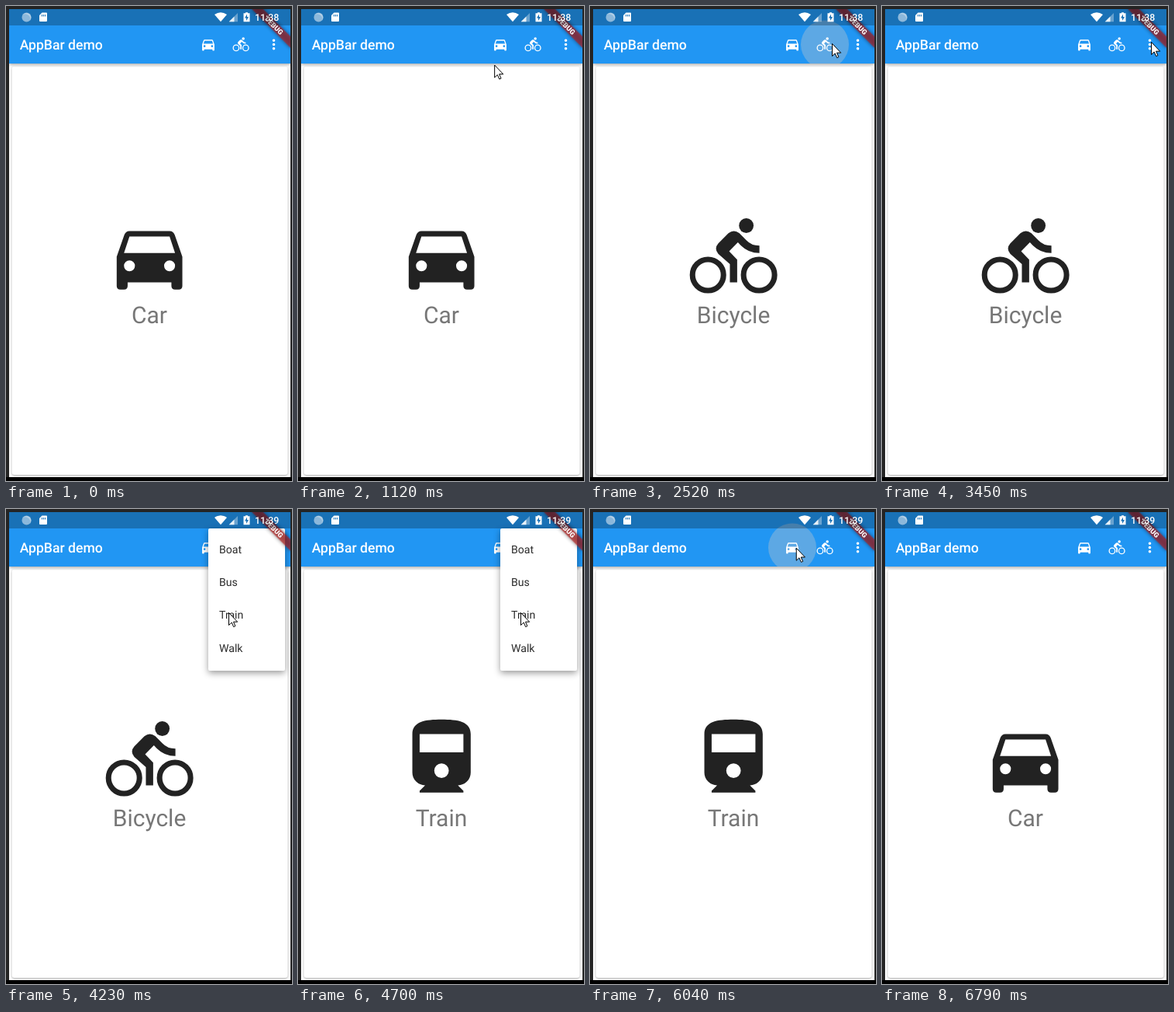
These frames come from a looping animation (369 by 611 pixels, 7480 ms). An HTML page:

```html
<!DOCTYPE html>
<html lang="en">
<head>
<meta charset="utf-8">
<title>AppBar demo</title>
<style>
  html, body { margin: 0; width: 100%; height: 100%; overflow: hidden; background: #242424; }
  svg { display: block; }
  text { font-family: Roboto, sans-serif; text-rendering: geometricPrecision; }
  .medium { font-weight: 500; fill: #fff; }
  .ring { fill: none; stroke: currentColor; stroke-width: 1.5; }
  #bar { filter: drop-shadow(0 1px 2px #0006); }
  #card { filter: drop-shadow(0 1px 1px #0005); }
  #panel { filter: drop-shadow(0 3px 4px #0006); }
  #strip { filter: drop-shadow(0 0 3px #000b); }
</style>
</head>
<body>
<svg width="369" height="611" viewBox="0 0 369 611">
  <defs fill-rule="evenodd">
    <path id="Car" fill-rule="evenodd" d="M3 12L5.1 6Q5.5 5 6.500 5h11q1 0 1.400 1L21 12v8q0 1-1 1h-1q-1 0-1-1v-1H6v1q0 1-1 1H4q-1 0-1-1zM5 11h14l-1.500-4.500h-11zM5 14.500a1.500 1.500 0 0 0 3 0 1.500 1.500 0 0 0-3 0zm11 0a1.500 1.500 0 0 0 3 0 1.500 1.500 0 0 0-3 0z"/>
    <g id="Bicycle">
      <circle cx="15.5" cy="3.5" r="2"/>
      <circle class="ring" cx="5" cy="17" r="4.25"/>
      <circle class="ring" cx="19" cy="17" r="4.25"/>
      <path d="M10.8 10.5l2.4-2.4.8.8Q16.100 11 19.100 11V9Q16.900 9 15.500 7.500l-1.900-1.900q-1.500-1.200-3 0L7.800 8.400q-1.200 1.400 0 2.800L11 14v5h2v-6.200z"/>
    </g>
    <path id="Train" fill-rule="evenodd" d="M4 5c0-3.500 3.600-4 8-4s8 .5 8 4v10.500a3.500 3.500 0 0 1-3.500 3.500l1.500 1.500v.5H6v-.5L7.500 19A3.500 3.500 0 0 1 4 15.500zM6 5v5h12V5zM10 15a2 2 0 0 0 4 0 2 2 0 0 0-4 0z"/>
  </defs>
  <path d="M0 606h369v5H0z"/>

  <svg x="4" y="4" width="363" height="602" viewBox="4 4 363 602">
    <path fill="#fdfdfd" d="M4 4h363v602H4z"/>
    <rect id="card" x="7.5" y="77.5" width="356" height="525.5" rx="3.5" fill="#fff"/>
    <use id="picture" transform="translate(128.7 266) scale(4.706)" fill="#222" color="#222"/>
    <text id="label" x="185" y="407.5" font-size="30" text-anchor="middle" fill="#777"></text>

    <path id="bar" fill="#2196f3" d="M4 4h363v70H4z"/>
    <svg x="4" y="4" width="363" height="70" viewBox="4 4 363 70">
      <circle id="ripple" cy="49.5" fill="#c8c8c8"/>
    </svg>
    <text class="medium" x="17.7" y="56" font-size="17.6">AppBar demo</text>
    <g fill="#fff" color="#fff">
      <use href="#Car" transform="translate(250.4 38.9) scale(.882)"/>
      <use href="#Bicycle" transform="translate(292.5 38.9) scale(.882)"/>
      <path d="M345.5 44.2v10.7" stroke="#fff" stroke-width="3.6" stroke-linecap="round" stroke-dasharray="0 5.3"/>
    </g>

    <g id="menu" font-size="14.1" fill="#2c2c2c">
      <rect id="panel" y="25" rx="2" fill="#fff"/>
    </g>

    <g transform="translate(367 4) rotate(45) scale(.882)">
      <path id="strip" fill="#b71c1c" fill-opacity=".63" d="M-40 28h80v12h-80z"/>
      <text y="37.6" font-size="10.2" font-weight="900" fill="#fff" text-anchor="middle">DEBUG</text>
    </g>

    <path fill-opacity=".25" d="M4 4h363v21H4z"/>
    <g fill="#fff" fill-rule="evenodd">
      <circle cx="26.5" cy="14.5" r="6" fill-opacity=".5"/>
      <path d="M22 11a6 6 0 0 1 9 8a6.5 6.5 0 0 0-9-8z" fill-opacity=".35"/>
      <path d="M46.5 8.500H52q1 0 1 1V19q0 1-1 1h-8q-1 0-1-1v-7zM46 11v2.500h1V11zm2 0v2.500h1V11zm2 0v2.500h1V11z"/>
      <path d="M277 20.3L269 11q8-5.400 16 0z"/>
      <path d="M299 9v11.300h-11.300z" fill-opacity=".35"/>
      <path d="M294.5 13.500v6.800h-6.800z" fill-opacity=".85"/>
      <path d="M309 8.300h3v1h2.500v11h-8v-11h2.500zM311 10.500l-3 5h2v3.500l3-5h-2z"/>
    </g>
    <text class="medium" id="clock" x="321" y="19" font-size="12.35"></text>
  </svg>
  <path id="cursor" d="M.5.5v16L4.200 13l2.500 5.600 2.200-1-2.400-5.400h5.200z" fill="#fff" stroke="#000"/>
</svg>

<script>
const LOOP = 7480, ENTER = 500, EXIT = 6790;
const CAR = 261, BIKE = 303, MORE = 345.5;

const $ = id => document.getElementById(id);
const set = (el, attrs) => { for (const k in attrs) el.setAttribute(k, attrs[k]); };
const ramp = (t, start, length) => Math.min(1, Math.max(0, (t - start) / length));
const smooth = p => p * p * (3 - 2 * p);
const easeOut = p => 1 - (1 - p) ** 3;
const mix = (a, b, p) => a + (b - a) * p;
const latest = (list, t) => list.findLast(entry => entry.at <= t);

const views = [
  { at: 0, name: 'Car' },
  { at: 2400, name: 'Bicycle' },
  { at: 4630, name: 'Train' },
  { at: 6060, name: 'Car' }
];
const taps = [
  { at: 1330, x: CAR }, { at: 2180, x: BIKE }, { at: 3480, x: MORE }, { at: 5830, x: CAR }
];

// Each pointer move: start, length, and where it ends
const moves = [
  [ENTER, 330, 194, 290],
  [830, 370, CAR, 47],
  [1350, 470, 332, 54],
  [1820, 230, 312, 48],
  [2830, 600, 347, 46],
  [3680, 400, 277, 97],
  [4140, 90, 287, 133],
  [4860, 435, 275, 351],
  [5620, 230, CAR, 50],
  [6000, 250, 327, 47],
  [6430, 360, 230, 611]
];

function pointer(t) {
  let x = 369, y = 514;
  for (const [start, length, toX, toY] of moves) {
    const p = smooth(ramp(t, start, length));
    x = mix(x, toX, p);
    y = mix(y, toY, p);
  }
  return `translate(${x} ${y})`;
}

const items = ['Boat', 'Bus', 'Train', 'Walk'].map((name, i) => {
  const item = document.createElementNS('http://www.w3.org/2000/svg', 'text');
  set(item, { x: 275, y: 56.5 + 42.35 * i });
  item.textContent = name;
  $('menu').append(item);
  return item;
});

// The panel widens, then grows down while its items fade in one by one
function drawMenu(t) {
  const p = ramp(t, 3580, 300), unit = 1 / (items.length + 1.5);
  const width = 99 * ramp(p, 0, unit);
  set($('menu'), { opacity: ramp(p, 0, 1 / 3) * (1 - ramp(t, 4850, 210)) });
  set($('panel'), { x: 360 - width, width, height: 183 * ramp(p, 0, items.length * unit) });
  items.forEach((item, i) =>
    set(item, { opacity: ramp(p, (i + 1) * unit, 1.5 * unit) }));
}

function drawRipple(t) {
  const tap = latest(taps, t) || { at: LOOP, x: 0 };
  const age = t - tap.at;
  set($('ripple'), {
    cx: tap.x,
    r: 9 + 22 * easeOut(ramp(age, 0, 230)),
    opacity: .36 * ramp(age, 0, 70) * (1 - ramp(age, 350, 70))
  });
}

function draw(t) {
  const { name } = latest(views, t);
  set($('picture'), { href: '#' + name });
  $('label').textContent = name;
  $('clock').textContent = t < 3800 ? '11:38' : '11:39';
  drawRipple(t);
  drawMenu(t);
  set($('cursor'), {
    visibility: t >= ENTER && t < EXIT ? 'visible' : 'hidden',
    transform: pointer(t)
  });
}

const begin = performance.now();
function frame() {
  draw((performance.now() - begin) % LOOP);
  requestAnimationFrame(frame);
}
frame();
</script>
</body>
</html>
```
